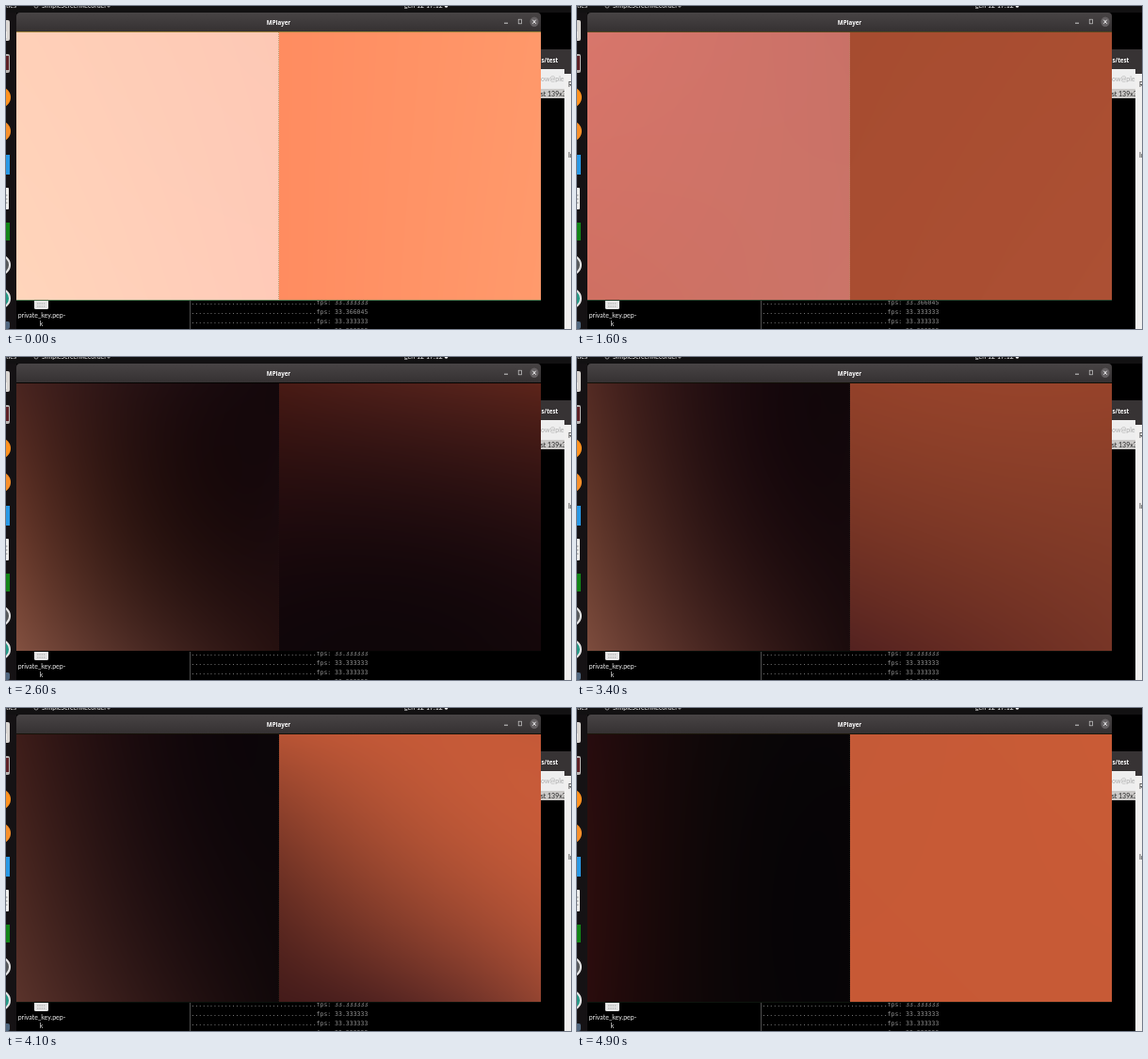
Animation, 600 px wide and 343 px high, one loop 5000 ms. Source, as an HTML page with a canvas:

```html
<!DOCTYPE html>
<html lang="en">
<head>
<meta charset="utf-8">
<title>Screen recording</title>
<style>
  html, body { margin: 0; width: 100%; height: 100%; overflow: hidden; background: #000; }
  #stage { position: absolute; left: 0; top: 0; width: 600px; height: 343px; overflow: hidden; }
  svg { position: absolute; left: 0; top: 0; }
  canvas { position: absolute; left: 11px; top: 28px; }
  text { font: 7px Lato, "Open Sans", sans-serif; fill: #eee; }
  .bold { font: 700 6.2px "Open Sans", Lato, sans-serif; fill: #fff; }
  .mid { text-anchor: middle; }
  .mono { font: 6.5px "DejaVu Sans Mono", monospace; fill: #909090; white-space: pre; }
</style>
</head>
<body>
<div id="stage">
  <svg width="600" height="343" viewBox="0 0 600 343">
    <defs>
      <linearGradient id="bar" x2="0" y2="1">
        <stop stop-color="#484445"/><stop offset="1" stop-color="#353132"/>
      </linearGradient>
    </defs>
    <rect width="600" height="343"/>

    <!-- top panel -->
    <rect width="600" height="7" fill="#121112"/>
    <text x="0" y="2.3">ties</text>
    <circle cx="32" cy="0" r="2" fill="none" stroke="#bbb" stroke-width=".7"/>
    <text x="38" y="2.3">SimpleScreenRecorder</text>
    <path d="M107 0h4l-2 2z" fill="#888"/>
    <text x="423" y="2.3">gen 12 17:12</text>
    <circle cx="467.5" cy="0" r="1.8" fill="#eee"/>

    <!-- dock -->
    <rect y="7" width="11" height="336" fill="#151214"/>
    <rect x="-14" y="15" width="18" height="22" rx="2" fill="#d9d5d1"/>
    <rect x="-14" y="27" width="15" height="7" fill="#efece8"/>
    <rect x="-14" y="51" width="18" height="20" rx="2" fill="#b9b4b2"/>
    <rect x="-14" y="53" width="17" height="15" fill="#5d2025"/>
    <circle cx="-6" cy="97" r="11" fill="#ff921f"/>
    <circle cx="-6" cy="133" r="11" fill="#f8902a"/>
    <rect x="-15" y="158" width="19" height="21" fill="#2898e5"/>
    <rect x="-14" y="193" width="17" height="23" rx="1" fill="#eeeeec"/>
    <path d="M0 201h1.5M0 205h1.5M0 209h1.5" stroke="#888" stroke-width="1"/>
    <rect x="-15" y="230" width="19" height="19" fill="#118417"/>
    <circle cx="-6" cy="275" r="10" fill="#55585a" stroke="#e6e6e6" stroke-width="2"/>
    <circle cx="-6" cy="310.5" r="10" fill="#259a86" stroke="#e6e6e6" stroke-width="2"/>
    <rect x="-14" y="335" width="18" height="8" rx="2" fill="#50677f"/>

    <!-- desktop file -->
    <rect x="30" y="306" width="15" height="16" rx="1.5" fill="#e5e5e5"/>
    <path d="M33 316h9M33 319h9" stroke="#aaa" stroke-width="1" stroke-dasharray="1.5 .8"/>
    <text class="mid" x="38" y="331">private_key.pep-</text>
    <text class="mid" x="37.5" y="340">k</text>

    <!-- log output -->
    <path d="M195.5 313V343" stroke="#626262" stroke-width=".8"/>
    <g id="log"></g>

    <!-- windows behind -->
    <rect x="560" y="46" width="40" height="27" fill="#373334"/>
    <text class="bold" x="568.5" y="59.5">s/test</text>
    <rect x="560" y="67" width="33" height="21" fill="#eeeeee"/>
    <text x="568" y="80.3" style="fill:#aaa">ow@plen</text>
    <rect x="560" y="88" width="33" height="10" fill="#cbc9c7"/>
    <text x="566" y="95.7" style="fill:#222">ist 139x3</text>
    <rect x="560" y="98" width="33" height="245"/>
    <rect x="593" y="72" width="7" height="271" fill="#f1f0ef"/>
    <text x="597" y="86" style="fill:#222">R</text>
    <text x="597" y="161" style="fill:#222">In</text>

    <!-- player window -->
    <rect x="11" y="27" width="557" height="286"/>
    <path d="M11 27V11q0-4 4-4H564q4 0 4 4V27z" fill="url(#bar)"/>
    <text class="bold mid" x="289.5" y="19.5">MPlayer</text>
    <path d="M529 18.2h4" stroke="#ddd" stroke-width=".9"/>
    <rect x="544.2" y="14.2" width="3.4" height="4.6" fill="none" stroke="#ccc" stroke-width=".7"/>
    <ellipse cx="561" cy="16.7" rx="4.6" ry="5.2" fill="#656163"/>
    <path d="M559.3 14.7l3.4 4M562.7 14.7l-3.4 4" stroke="#fff" stroke-width=".9"/>
  </svg>

  <canvas id="video" width="557" height="284"></canvas>

  <svg width="600" height="343" viewBox="0 0 600 343">
    <g id="edges" fill="none" stroke-width="1">
      <path d="M11 27.5H568" stroke="#e0b850"/>
      <path d="M11 312.5H568" stroke="#6aa56e"/>
      <path d="M289.5 28V312" stroke="#a9884a" stroke-dasharray="1 1"/>
    </g>
  </svg>
</div>

<script>
const LOOP = 5000, STEP = 100;
const W = 557, H = 284, SPLIT = 279;

// Each pane is a square grid of colours, read row by row.
const KEYS = [
  [0, "ffd0b8 fdc8b5 ffd5bb ffcab8", "ff8c60 ff986a ff8c60 ff9a6c"],
  [1000, "ffd2bb fcc5b0 ffd6bd fec4af", "ff8b60 ff986a ff8c60 ff9a6c"],
  [1600, "d8766b c97167 cf7062 cb7468", "a64c30 aa4e31 a94d31 ac5034"],
  [2600, "4a2520 241012 14080b 643629 28120f 190a0d 825040 482822 25100f",
         "481a14 50201a 5c241a 200b0d 200c0e 280f10 10060a 0f0609 14070a"],
  [3700, "562c24 1f0c0f 10070a 643a2d 2a1314 13080b 7a4a3c 42221e 170a0c",
         "ae4f31 b05031 ac4e30 9a452e a54b30 a84d31 6c2c28 883a2c 9c4631"],
  [4500, "260e0f 10070a 080508 301414 13090b 080507 3a1c1a 1a0c0e 0a0607",
         "c05838 d8623e dc6440 48201c 9e4a32 d8623e 1c0a0c 30161a 8a4230"],
  [4900, "270c0e 0e0708 080507 2b0d0d 0d0607 070406 2a0c0d 0d0607 070406",
         "c55a37 c95b36 c75935 c75a36"]
].map(([at, left, right]) => ({ at, panes: [grid(left), grid(right)] }));

function mix(a, b, k) {
  return a.map((v, i) => v + (b[i] - v) * k);
}

function grid(list) {
  const c = list.split(" ").map(h => [0, 2, 4].map(i => parseInt(h.slice(i, i + 2), 16)));
  if (c.length === 9) return c;
  const row = (a, b) => [a, mix(a, b, .5), b];
  const top = row(c[0], c[1]), bottom = row(c[2], c[3]);
  return [...top, ...top.map((v, i) => mix(v, bottom[i], .5)), ...bottom];
}

// Quadratic weights through 0, 1/2 and 1.
function weights(u) {
  return [(1 - u) * (1 - 2 * u), 4 * u * (1 - u), u * (2 * u - 1)];
}

function blend(w, a, b, c) {
  return a.map((v, i) => w[0] * v + w[1] * b[i] + w[2] * c[i]);
}

const ctx = document.getElementById("video").getContext("2d");
const image = ctx.createImageData(W, H);
const columns = Array.from({ length: W }, (_, x) =>
  weights(x < SPLIT ? x / (SPLIT - 1) : (x - SPLIT) / (W - SPLIT - 1)));
const rows = Array.from({ length: H }, (_, y) => weights(y / (H - 1)));

function drawVideo(t) {
  let i = KEYS.length - 1;
  while (KEYS[i].at > t) i--;
  const a = KEYS[i], b = KEYS[Math.min(i + 1, KEYS.length - 1)];
  const k = a === b ? 0 : (t - a.at) / (b.at - a.at);
  const panes = a.panes.map((g, p) => g.map((v, n) => mix(v, b.panes[p][n], k)));
  let o = 0;
  for (let y = 0; y < H; y++) {
    const line = panes.map(g => [0, 1, 2].map(n => blend(rows[y], g[n], g[n + 3], g[n + 6])));
    for (let x = 0; x < W; x++) {
      const [l, m, r] = line[x < SPLIT ? 0 : 1], w = columns[x];
      for (let c = 0; c < 3; c++) image.data[o++] = w[0] * l[c] + w[1] * m[c] + w[2] * r[c];
      image.data[o++] = 255;
    }
  }
  ctx.putImageData(image, 0, 0);
  const glow = (panes[0][4][0] + panes[1][4][0]) / 510;
  document.getElementById("edges").setAttribute("opacity", (glow * glow * .7).toFixed(3));
}

const log = document.getElementById("log");
const lines = Array.from({ length: 4 }, (_, i) => {
  const line = document.createElementNS("http://www.w3.org/2000/svg", "text");
  line.setAttribute("class", "mono");
  line.setAttribute("x", 196.5);
  line.setAttribute("y", 317.4 + i * 9.8);
  return log.appendChild(line);
});

function drawLog(t) {
  const scrolled = (t >= 700) + (t >= 1700);
  lines.forEach((line, i) => {
    const fps = i + scrolled === 1 ? "33.366045" : "33.333333";
    line.textContent = ".".repeat(34) + "fps: " + fps;
  });
}

let shown = -1;
const start = performance.now();

function render(now) {
  const t = Math.floor((Math.max(0, now - start) % LOOP) / STEP) * STEP;
  if (t !== shown) {
    shown = t;
    drawVideo(t);
    drawLog(t);
  }
  requestAnimationFrame(render);
}
render(start);
</script>
</body>
</html>
```
